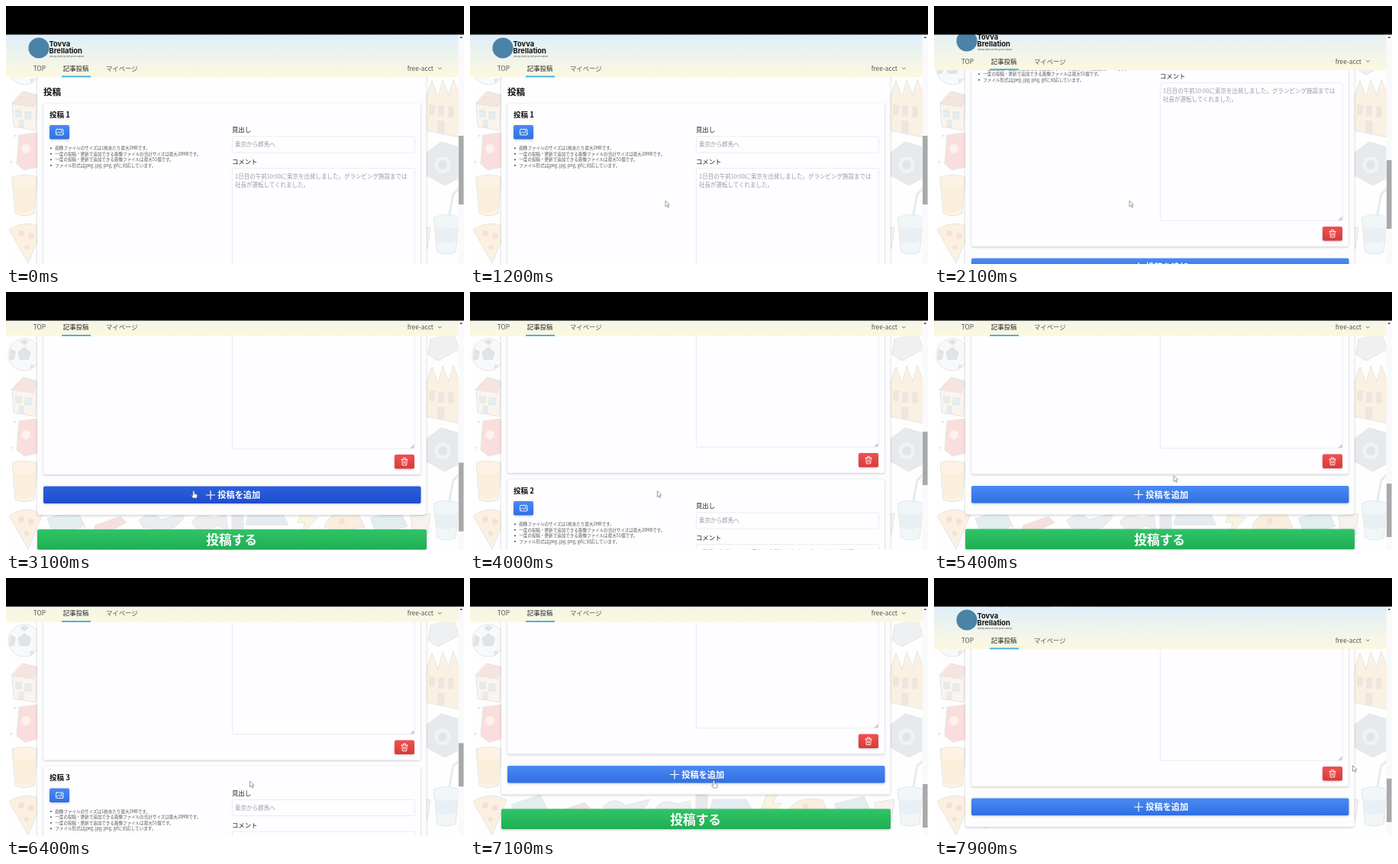
Recreate the animation shown at these times as an HTML page. Size 600 px wide and 338 px high, loop 8000 ms.

```html
<!DOCTYPE html>
<html lang="ja">
<head>
<meta charset="utf-8">
<title>投稿フォーム</title>
<style>
html, body { margin: 0; width: 100%; height: 100%; overflow: hidden; background: #fff; }
svg { display: block; width: 100vw; height: 100vh; }
text { font-family: "Noto Sans CJK JP", "Noto Sans CJK", "Noto Sans", sans-serif; white-space: pre; }
.brand { font-family: Inter, sans-serif; }
.icon { fill: none; stroke: #fff; stroke-width: .9; stroke-linejoin: round; stroke-linecap: round; }
.soft { filter: drop-shadow(0 1px 1.5px rgba(40, 45, 70, .25)); }
</style>
</head>
<body>
<svg id="stage" viewBox="0 0 600 338"></svg>
<script>
const LOOP = 8000, CARD_PITCH = 308;
const stage = document.getElementById('stage');

const rect = (x, y, w, h, fill, extra = '') =>
  `<rect x="${x}" y="${y}" width="${w}" height="${h}" fill="${fill}" ${extra}/>`;
const path = (d, fill, extra = '') => `<path d="${d}" fill="${fill}" ${extra}/>`;
const circle = (x, y, r, fill, extra = '') => `<circle cx="${x}" cy="${y}" r="${r}" fill="${fill}" ${extra}/>`;
// Places text by its left edge and vertical centre.
const label = (x, cy, size, str, fill = '#222', weight = 400, extra = '') =>
  `<text x="${x}" y="${cy + size * .38}" font-size="${size}" fill="${fill}" font-weight="${weight}" ${extra}>${str}</text>`;
const gradient = (id, ...colors) => `<linearGradient id="${id}" x2="0" y2="1">` +
  colors.map((c, i) => `<stop offset="${i / (colors.length - 1)}" stop-color="${c}"/>`).join('') + '</linearGradient>';

function doodles() {
  const ink = 'stroke="#6b6470" stroke-width="1"';
  return `<g opacity=".17" stroke-linejoin="round">` +
    circle(24, 82, 21, '#dde3ea', ink) + path('M24 72l9 7-3 10H18l-3-10zM6 74l7 4-2 10-7 2zM24 62l6 3-6 5-6-5zM31 96l7-1-5 7z', '#53657a') +
    path('M8 127L22 112 42 117 40 130 39 163 10 158z', '#e8c79c', ink) + path('M7 128L22 112 42 117 36 132z', '#d0704c', ink) +
    path('M13 137h7v8h-7zM25 139h8v9h-8zM17 150h6v9h-6z', '#6c9cba', ink) +
    path('M17 169L41 166 42 211 24 215 14 207z', '#e5483c', ink) + circle(26, 187, 6, '#f6b6a2') +
    path('M8 224Q24 219 41 224L37 272Q24 277 12 272z', '#f3c36a', ink) + path('M10 236Q24 241 39 236L36 268Q24 273 13 268z', '#f0a83c') +
    path('M4 293Q26 278 48 291L29 337z', '#f0b757', ink) + circle(20, 298, 4, '#d84b36') + circle(33, 301, 4, '#d84b36') + circle(27, 316, 3, '#d84b36') +
    path('M556 62L586 54 594 75 566 90 553 82z', '#a9b0b4', ink) +
    path('M550 121L558 98 566 120 572 97 580 117 586 96 594 117V172L550 163z', '#eeb65f', ink) +
    path('M555 130h6v12h-6zM567 131h6v13h-6zM580 132h6v13h-6zM566 151h8v15h-8z', '#b47135', ink) +
    path('M551 192L570 178 594 185V225L575 235 551 222z', '#7c8ba0', ink) + circle(572, 208, 12, '#a7b6c4', ink) + circle(572, 208, 6, '#596a80') +
    path('M580 278L586 246 594 239', 'none', 'stroke="#6098b5" stroke-width="3"') +
    path('M560 277Q577 270 594 277L589 322Q577 328 565 322z', '#b6d3e2', ink) + path('M562 289Q577 295 592 289L590 308Q577 313 564 308z', '#7eb0cc') +
    path('M54 297L92 284 103 306 64 322z', '#5da7a3', ink) + path('M64 322L103 306 104 311 66 328z', '#f0e6cd', ink) +
    path('M116 306L150 294 158 302 138 312Q126 326 116 316z', '#d45449', ink) +
    path('M174 299Q190 285 204 298L235 290Q226 314 200 311L180 309z', '#93a5b6', ink) +
    path('M243 302Q250 288 272 296L288 292 291 312 276 306 256 318z', '#a6a6b1', ink) +
    rect(296, 280, 15, 34, '#7e87a0', ink) + path('M318 290h44l8 15H314z', '#6e9ab6', ink) +
    path('M389 282h14l-6 13h12l-23 24 6-17h-10z', '#f2c545', ink) +
    path('M417 307Q424 284 462 291L470 308 428 315z', '#eda44b', ink) + circle(440, 300, 4, '#d84b36') +
    path('M477 296L516 286 526 307 486 318z', '#56a3a0', ink) +
    path('M530 294L556 290 552 318 533 320z', '#e1b5a8', ink) +
    circle(12, 170, 1.5, '#e5483c') + circle(7, 204, 1.5, '#e5483c') + '</g>';
}

const BULLETS = [
  '画像ファイルのサイズは1枚あたり最大2MBです。',
  '一度の投稿・更新で追加できる画像ファイルの合計サイズは最大20MBです。',
  '一度の投稿・更新で追加できる画像ファイルは最大51個です。',
  'ファイル形式はjpeg, jpg, png, gifに対応しています。'
];

function card(i) {
  const field = 'stroke="#e6e6ec" stroke-width=".8" rx="2"';
  return `<g id="card${i}" transform="translate(0 ${i * CARD_PITCH})">` +
    rect(49, 127.5, 494, 299.5, '#fefdff', 'rx="3" class="soft"') +
    label(57, 142, 9.6, `投稿 ${i + 1}`, '#111', 700) +
    rect(57, 156, 26, 18.5, 'url(#blue)', 'rx="2" class="soft"') +
    '<g class="icon"><rect x="65.5" y="161.5" width="9.5" height="7.5" rx="1"/><path d="M66 167.5l2.7-2.6 2 1.8 1.8-1.5 2.3 2.2"/><circle cx="72.3" cy="163.7" r=".5"/></g>' +
    BULLETS.map((s, k) => circle(59, 186.2 + k * 7.55, 1.05, '#555') + label(64.3, 186.2 + k * 7.55, 5.55, s, '#555')).join('') +
    label(296, 162.3, 8.4, '見出し', '#222', 500) + rect(296.4, 171, 239, 21, '#fefdff', field) +
    label(300, 181.3, 7.55, '東京から群馬へ', '#999ca3') +
    label(296, 204.3, 8.4, 'コメント', '#222', 500) + rect(296.4, 212.6, 239, 180.6, '#fefdff', field) +
    label(300, 223, 7.5, '1日目の午前10:00に東京を出発しました。グランピング施設までは', '#999ca3') +
    label(300, 234.2, 7.5, '社長が運転してくれました。', '#999ca3') +
    path('M530.5 392.5l4-4M532.7 392.7l2-2', 'none', 'stroke="#666" stroke-width=".7"') +
    rect(509, 401, 26, 18.5, 'url(#red)', 'rx="2" class="soft"') +
    '<path class="icon" d="M517.8 407.5h8.4M520.3 407.2v-1.7h3.4v1.7M518.7 407.7l.6 7.3h5.4l.6-7.3M521 409.7v3.2M523 409.7v3.2"/></g>';
}

stage.innerHTML = `<defs>` +
  gradient('sky', '#deeefb', '#eef4ec', '#fcf8de') + gradient('blue', '#4a8af3', '#2f6fe2') + gradient('navy', '#2b5fdd', '#1d4dcd') +
  gradient('red', '#f05050', '#d93a3a') + gradient('green', '#2fc566', '#20ae54') + `</defs>` +
  rect(0, 0, 600, 338, '#fefefe') + doodles() +
  `<g id="page">` +
    rect(41, -400, 509.5, 880, '#fdfdfe', 'id="panel" rx="3" class="soft"') +
    label(49, 113, 11.6, '投稿', '#111', 700) + [0, 1, 2].map(card).join('') +
    `<g id="footer">` +
      rect(49, 442.5, 494.5, 22.5, 'url(#blue)', 'id="add" rx="2" class="soft"') +
      path('M262 454h12M268 448v12', 'none', 'stroke="#fff" stroke-width="1.2"') +
      label(277.3, 454, 11.2, '投稿を追加', '#fff', 700) +
      rect(41, 499, 510, 26.5, 'url(#green)', 'rx="2" class="soft"') +
      label(262.3, 512.8, 16.7, '投稿する', '#fff', 700) +
    `</g></g>` +
  `<g id="header">` + rect(0, 37.5, 593, 55.7, 'url(#sky)') +
    circle(43, 55, 13.6, '#4b83a6') +
    label(56.5, 49.8, 9.4, 'Tovva', '#111', 700, 'class="brand"') +
    label(56.5, 58.6, 9.4, 'Brellation', '#111', 700, 'class="brand"') +
    label(57, 66.2, 2.5, 'Sharing small joys with good company', '#444', 400, 'class="brand"') +
    label(35.7, 81.8, 8.4, 'TOP', '#555') + label(74.8, 81.8, 8.4, '記事投稿', '#222', 500) + label(131, 81.8, 8.4, 'マイページ', '#555') +
    rect(73, 91.5, 38, 1.8, '#35aee2') + label(525.7, 81.8, 8.4, 'free-acct', '#555') +
    path('M566.3 80.6l2.1 2.1 2.1-2.1', 'none', 'stroke="#555" stroke-width=".9"') + `</g>` +
  rect(592.5, 37, 7.5, 301, '#fafafa') + path('M594.3 42l2-2.4 2 2.4z', '#555') + rect(593, 170, 6.5, 90, '#a9a9a9', 'id="thumb"') +
  rect(0, 0, 600, 37.5, '#000') +
  path('M0 0V7.8L1.9 6.2 3.2 9 4.5 8.4 3.2 5.7 5.5 5.5z', '#fff', 'id="arrow" stroke="#777" stroke-width=".7"') +
  path('M-1 0Q0-1 1 0V3.5L4 4.2Q5 4.5 4.7 6L4 9H-.8L-3 5.8Q-3 4.6-1 6z', '#fff', 'id="hand" stroke="#666" stroke-width=".6"');

const $ = id => document.getElementById(id);
const smooth = u => u * u * (3 - 2 * u);
const move = (el, x, y) => el.setAttribute('transform', `translate(${x} ${y})`);
const within = (t, a, b) => t >= a && t < b;

function track(t, keys, ease = smooth) {
  if (t <= keys[0][0]) return keys[0][1];
  for (let i = 1; i < keys.length; i++) {
    const [a, from] = keys[i - 1], [b, to] = keys[i];
    if (t <= b) return from + (to - from) * ease((t - a) / (b - a));
  }
  return keys[keys.length - 1][1];
}

const SCROLL_DOWN = [[1950, 0], [2000, 30], [2100, 112], [2200, 165], [2300, 184], [2400, 188]];
const SCROLL = [[3900, 188], [4000, 190], [4500, 496.5], [6650, 496.5], [7100, 812.5], [7500, 812.5], [7850, 770]];
const HEADER = [[2000, 0], [2300, -35.5], [7550, -35.5], [7850, 0]];
const CURSOR_X = [[2300, 256], [2700, 246], [4900, 245], [5400, 314], [5700, 319.5], [7300, 319.5], [7800, 548.5]];
const CURSOR_Y = [[2300, 255], [2700, 261], [4900, 260.5], [5400, 240.5], [5700, 266], [7300, 266], [7800, 245.5]];
// Thumb top, slope per scrolled pixel, length and base scroll for each card count.
const THUMBS = [[170, .285, 90, 0], [183, .222, 70, 190], [270, .17, 57, 812.5]];

function draw(time) {
  const t = Math.floor(time / 100) * 100;
  const count = t < 3500 ? 1 : t < 6100 ? 2 : 3;
  const scroll = t < 2500 ? track(t, SCROLL_DOWN, u => u) : track(t, SCROLL);
  const extra = (count - 1) * CARD_PITCH;

  move($('page'), 0, -scroll);
  move($('footer'), 0, extra);
  move($('header'), 0, track(t, HEADER));
  $('panel').setAttribute('height', 880 + extra);
  for (let i = 0; i < 3; i++) $('card' + i).style.display = i < count ? '' : 'none';

  const [top, slope, length, base] = THUMBS[count - 1];
  $('thumb').setAttribute('y', top + slope * (scroll - base));
  $('thumb').setAttribute('height', length);

  const hover = within(t, 2600, 3500) || within(t, 5600, 6100) || within(t, 7200, 7400);
  const pointing = hover || within(t, 7000, 7400);
  $('add').setAttribute('fill', hover ? 'url(#navy)' : 'url(#blue)');
  for (const [id, shown] of [['arrow', !pointing && t >= 1000], ['hand', pointing]]) {
    $(id).style.display = shown ? '' : 'none';
    move($(id), track(t, CURSOR_X), track(t, CURSOR_Y));
  }
}

function tick() {
  draw(performance.now() % LOOP);
  requestAnimationFrame(tick);
}
tick();
</script>
</body>
</html>
```
